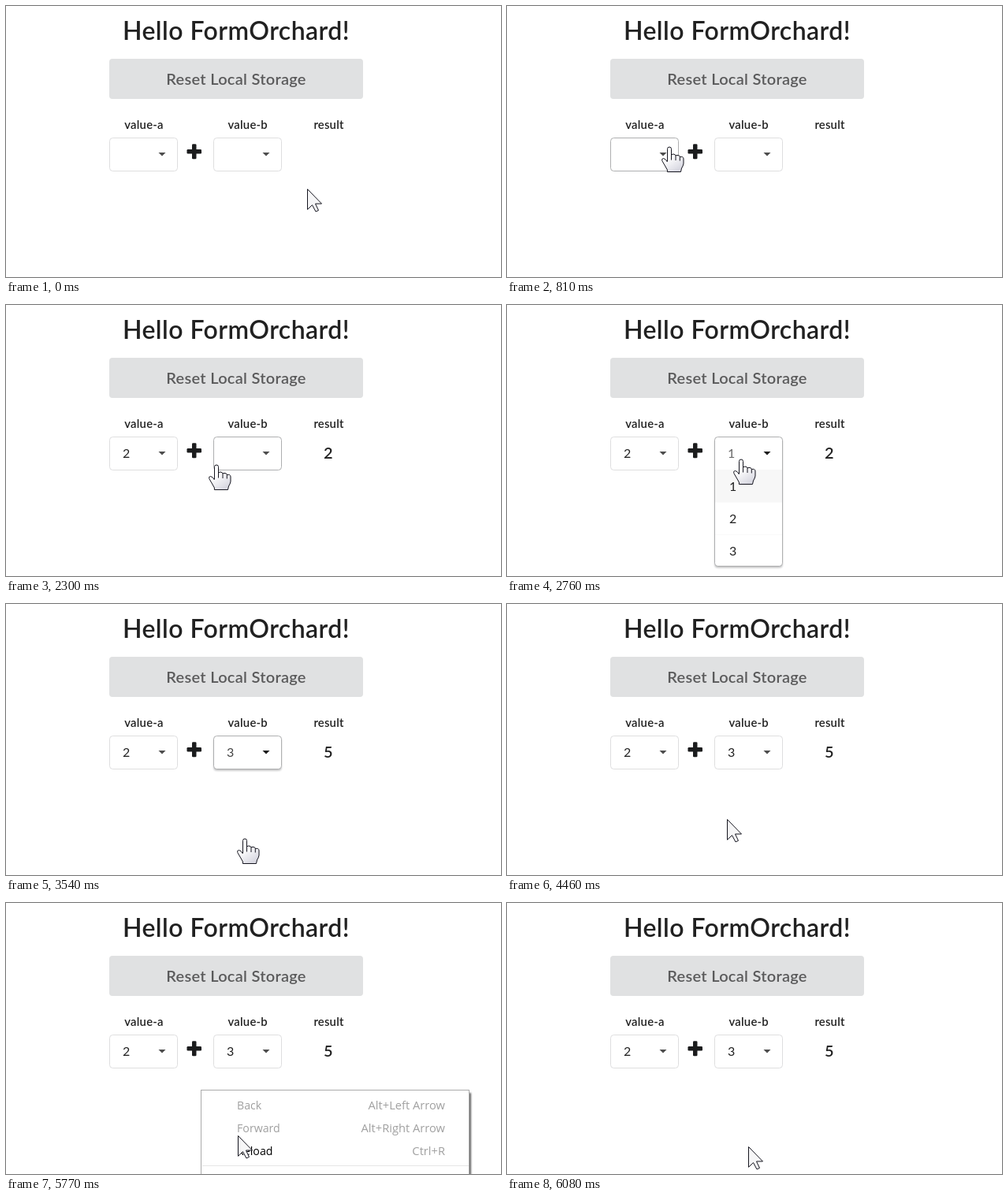
Animation of 628 by 344 pixels, one loop 8000 ms. Source, as an HTML page:

```html
<!DOCTYPE html>
<html lang="en">
<head>
<meta charset="utf-8">
<title>Adder demo</title>
<style>
  html, body { margin: 0; width: 100%; height: 100%; overflow: hidden; background: #fff; }
  svg { display: block; width: 628px; height: 344px; font-family: Lato, sans-serif; cursor: default; }
  .bold { font-weight: 600; letter-spacing: 0.014em; }
  .menu { font-family: "Open Sans", "Noto Sans", sans-serif; }
</style>
</head>
<body>
<svg viewBox="0 0 628 344">
  <defs>
    <linearGradient id="skin" x1="0" y1="0" x2="0.6" y2="1">
      <stop offset="0.45" stop-color="#fff"/>
      <stop offset="1" stop-color="#d9d9e2"/>
    </linearGradient>
    <filter id="soft" x="-10%" y="-10%" width="120%" height="130%">
      <feGaussianBlur stdDeviation="1.3"/>
    </filter>
  </defs>
  <g id="stage"></g>
</svg>
<script>
const LOOP = 8000, STEP = 78.5;
const INK = "#212121";
const stage = document.getElementById("stage");

// Pointer moves: start time, number of steps, end point
const moves = [
  [500, 5, 205, 180],
  [1590, 3, 185, 262],
  [2060, 5, 286, 189],
  [2760, 1, 296, 197],
  [2840, 6, 302, 299],
  [4300, 7, 248, 239],
  [4920, 1, 248, 237],
  [5530, 5, 306, 309]
];

const fields = [
  { x: 131, open: 1120, dark: 1340, close: 1980, value: 2 },
  { x: 263, open: 2450, dark: 2610, close: 3540, value: 3 }
];

const menuTime = [5070, 6080];
const within = (v, a, b) => v >= a && v < b;

function pointerAt(t) {
  let p = { x: 382, y: 232 };
  for (const [start, steps, x, y] of moves) {
    if (t < start) break;
    const k = Math.min(1, (Math.floor((t - start + 4) / STEP) + 1) / steps);
    p = { x: Math.round(p.x + (x - p.x) * k), y: Math.round(p.y + (y - p.y) * k) };
  }
  return p;
}

const rect = (x, y, w, h, fill, more = "") =>
  `<rect x="${x}" y="${y}" width="${w}" height="${h}" fill="${fill}" ${more}/>`;

const text = (s, x, y, size, fill = INK, more = "") =>
  `<text x="${x}" y="${y}" font-size="${size}" fill="${fill}" ${more}>${s}</text>`;

const centred = (s, x, y, size, fill) =>
  text(s, x, y, size, fill, 'class="bold" text-anchor="middle"');

function page() {
  return centred("Hello FormOrchard!", 292, 42.5, 32) +
    rect(131, 67, 322, 51, "#e0e1e2", 'rx="4"') +
    centred("Reset Local Storage", 292, 99.5, 20, "#5a5a5b") +
    centred("value-a", 175, 155.5, 14.86) +
    centred("value-b", 306.7, 155.5, 14.86) +
    centred("result", 409.5, 155.5, 14.86) +
    rect(229.5, 182, 18.5, 5.5, "#1b1c1d", 'rx="1.3"') +
    rect(236, 175.3, 5.5, 19, "#1b1c1d", 'rx="1.3"');
}

function field(f, t, p) {
  const open = within(t, f.open, f.close);
  const fading = within(t, f.close, f.close + 80);
  const hover = within(p.x, f.x, f.x + 87) && within(p.y, 167, 210);
  const active = open || hover || within(t, f.close, f.close + 160);
  const height = open ? 164 : 42;
  let out = "";
  if (open || fading)
    out += rect(f.x + 0.5, 169.5, 86, height, "#222426", 'rx="4" opacity="0.3" filter="url(#soft)"');
  out += rect(f.x + 0.5, 167.5, 86, height, "#fff", 'rx="4"');

  if (open) {
    for (let i = 0; i < 3; i++) {
      const top = 209 + 41 * i;
      const over = within(p.x, f.x, f.x + 87) && within(p.y, top, top + 41);
      const fill = over ? "#f1f1f1" : i ? "#fff" : "#f7f7f7";
      out += rect(f.x + 1, top, 85, i < 2 ? 41 : 40, fill, i < 2 ? "" : 'rx="3"');
      out += rect(f.x + 1, top, 85, 1, i ? "#fafafa" : fill);
      out += text(i + 1, f.x + 19, top + 27, 16);
    }
  }
  out += rect(f.x + 0.5, 167.5, 86, height, "none",
    `rx="4" stroke="${active ? "#aeafb0" : "#dededf"}"`);

  if (t >= f.open)
    out += text(open ? 1 : f.value, f.x + 17, 194, 16, open ? "#696969" : fading ? "#444" : INK);
  const dark = within(t, f.dark, f.close + 160);
  return out + `<path d="M${f.x + 62.5} 186h9l-4.5 4.6z" fill="${dark ? "#1c1c1c" : "#4d4d4d"}"/>`;
}

function contextMenu(p) {
  const rows = [["Back", "Alt+Left Arrow"], ["Forward", "Alt+Right Arrow"], ["Reload", "Ctrl+R"]];
  let out = rect(251, 241, 339, 120, "#000", 'opacity="0.6" filter="url(#soft)"') +
    rect(247.5, 237.5, 340, 120, "#fff", 'stroke="#ababab"');
  rows.forEach(([name, keys], i) => {
    const y = 262 + 29 * i, live = i === 2;
    if (live && within(p.y, 300, 329)) out += rect(249, 300, 338, 29, "#ebebeb");
    out += text(name, 293, y, 14.2, live ? "#000" : "#a0a0a0", 'class="menu"');
    out += text(keys, 557, y, 14.7, "#a0a0a0", 'class="menu" text-anchor="end"');
  });
  return out + rect(249, 333, 338, 1, "#e6e6e6");
}

function pointer(p, t) {
  const hand = fields.some(f => within(p.x, f.x, f.x + 87) &&
    within(p.y, 167, within(t, f.open, f.close + 80) ? 331 : 210));
  const shape = hand
    ? `<path d="M-2.5 18V2.4Q-2.5 0 0 0T2.5 2.4V10Q4 8.6 6 9.2T8 11Q10 9.8 12 10.8T13.3 12.6
        Q17.8 11.4 18 15V21Q17.5 24 15.5 27L14.5 31.5H-2.6V29L-6 23L-9.2 17.5Q-10 14.5 -7.5 14.5T-2.5 19"/>
       <path d="M2.5 10V16.5M8 11V17M13.3 12.6V17.5" fill="none"/>`
    : '<path d="M0.5 0.5V26.3L6.5 20.6L11 29L14.5 27.4L10.5 19H18.5Z" fill="#f6f6f7"/>';
  const x = p.x + (hand ? 1 : 0), y = p.y - (hand ? 1 : 0);
  return `<g transform="translate(${x} ${y})" fill="url(#skin)" stroke="#15151f" stroke-width="1"
    stroke-linejoin="round">${shape}</g>`;
}

function scene(t) {
  const p = pointerAt(t);
  const sum = fields.reduce((n, f) => n + (t >= f.close ? f.value : 0), 0);
  return page() +
    (sum ? centred(sum, 409, 194.7, 20) : "") +
    fields.map(f => field(f, t, p)).join("") +
    (within(t, ...menuTime) ? contextMenu(p) : "") +
    pointer(p, t);
}

let shown = "";
function draw() {
  const next = scene(performance.now() % LOOP);
  if (next !== shown) stage.innerHTML = shown = next;
  requestAnimationFrame(draw);
}
draw();
</script>
</body>
</html>
```
